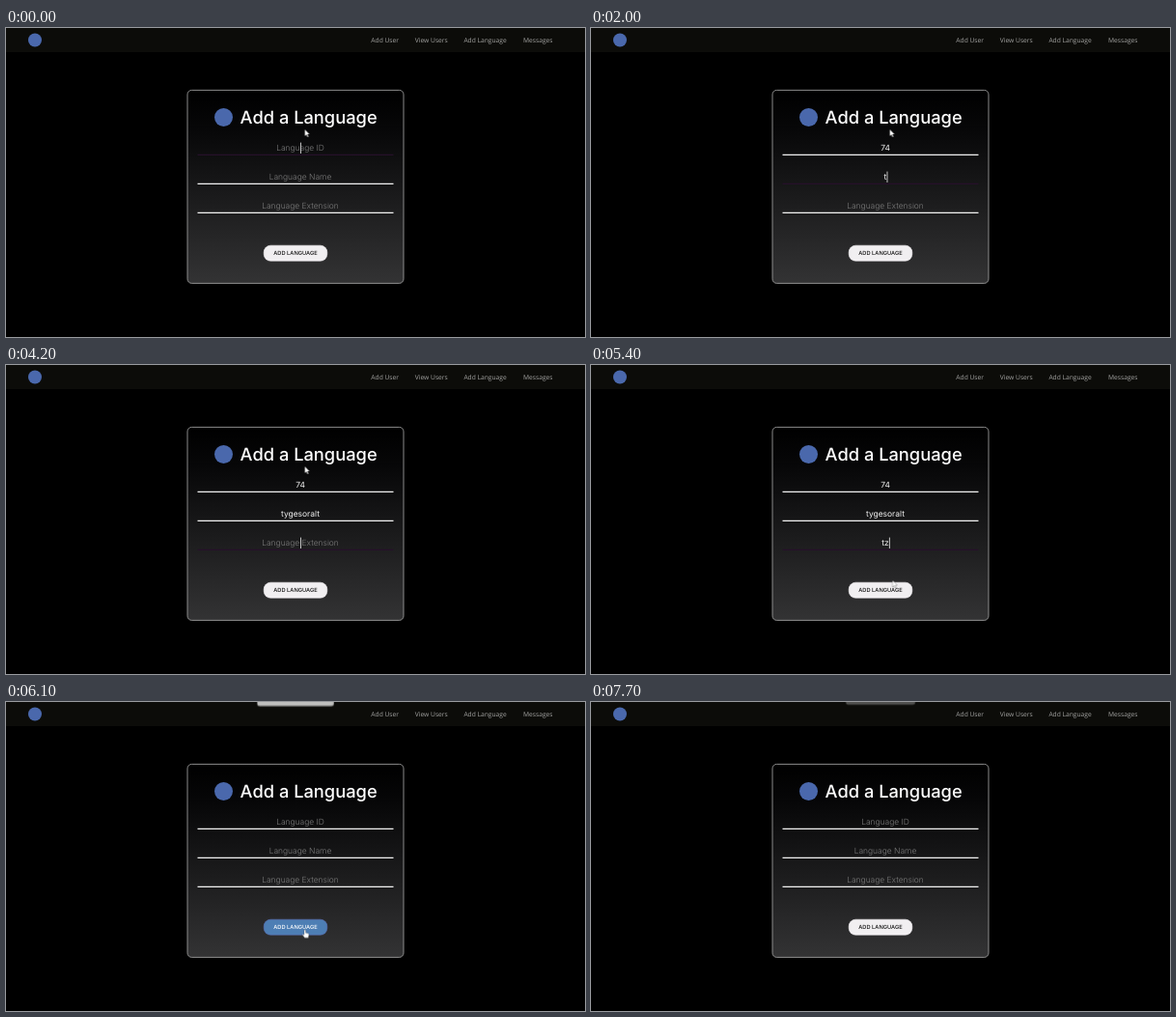
Recreate the animation shown at these times as an HTML page. Size 600 by 320 pixels, loop 7800 ms.

```html
<!DOCTYPE html>
<html lang="en">
<head>
<meta charset="utf-8">
<title>Add a Language</title>
<style>
  html, body { margin: 0; width: 100%; height: 100%; overflow: hidden; background: #000; }
  svg { display: block; width: 100%; height: 100%; }
  text { font-family: Inter, "Open Sans", sans-serif; text-rendering: geometricPrecision; }

  .nav text { font: 6.7px "Open Sans", "Noto Sans", sans-serif; fill: #a3a3a1; }
  .title { font-size: 18.3px; font-weight: 500; fill: #fff; }
  .field text { font-size: 8.45px; font-weight: 400; fill: #f4f4f4; text-anchor: middle; }
  .field text.empty { font-weight: 300; fill: #7b7b7b; }
  .field line { stroke: #f2f2f2; stroke-width: 1.3; }
  .field.focus line { stroke: #26102a; }
  #caret { fill: #eee; }

  .button text { font-size: 5.73px; font-weight: 500; text-anchor: middle; }
  .message { font-size: 8.45px; fill: #363636; }

  .button rect, .button text, .toast, .badge, .tick, .cursor, .arrow, .hand {
    animation: 7.8s linear infinite both;
  }
  .toast, .badge { transform-box: fill-box; transform-origin: center; }

  .button rect { animation-name: button-fill; }
  .button text { animation-name: button-text; }
  @keyframes button-fill {
    0%, 69.6%, 83.8%, 100% { fill: #f1eff1; stroke: #f1eff1; }
    72.4%, 81.3% { fill: #4d7eb4; stroke: #5d70b4; }
  }
  @keyframes button-text {
    0%, 69.6%, 83.8%, 100% { fill: #111; }
    72.4%, 81.3% { fill: #fff; }
  }

  .toast { animation-name: toast; }
  @keyframes toast {
    0%, 77.7% { transform: translateY(-45px) scale(.6); opacity: .5; animation-timing-function: cubic-bezier(.21, 1.02, .73, 1); }
    81.17% { transform: none; opacity: 1; }
    97.54% { transform: none; opacity: 1; animation-timing-function: cubic-bezier(.069, .549, .493, .865); }
    100% { transform: translateY(-31.2px) scale(.63); opacity: .075; }
  }

  .badge { animation-name: badge; }
  @keyframes badge {
    0%, 78.69% { transform: scale(0); animation-timing-function: cubic-bezier(.175, .885, .32, 1.275); }
    81.65%, 100% { transform: scale(1); }
  }

  .tick { stroke-dasharray: 1 2; animation-name: tick; }
  @keyframes tick {
    0%, 79.68% { stroke-dashoffset: 1.1; }
    81.65%, 100% { stroke-dashoffset: 0; }
  }

  .cursor { animation-name: cursor; }
  @keyframes cursor {
    0%, 63.4% { transform: translate(309.6px, 105px); animation-timing-function: ease-in-out; }
    69.2% { transform: translate(312.6px, 222.6px); animation-timing-function: ease-out; }
    71.8%, 80.7% { transform: translate(309px, 235.5px); animation-timing-function: ease-in-out; }
    83.1%, 92.9% { transform: translate(378.7px, 224.6px); animation-timing-function: ease-in; }
    95.5%, 100% { transform: translate(396px, 326px); }
  }

  .arrow, .hand { animation-timing-function: step-end; }
  .arrow { animation-name: arrow; }
  .hand { animation-name: hand; }
  @keyframes arrow { 0%, 81.3%, 100% { opacity: 1; } 69.8% { opacity: 0; } }
  @keyframes hand { 0%, 81.3%, 100% { opacity: 0; } 69.8% { opacity: 1; } }
</style>
</head>
<body>
<svg viewBox="0 0 600 320">
  <defs>
    <linearGradient id="card" x2="0" y2="1">
      <stop offset="0" stop-color="#000"/>
      <stop offset=".2" stop-color="#070708"/>
      <stop offset="1" stop-color="#333334"/>
    </linearGradient>
  </defs>
  <rect width="600" height="320"/>

  <g class="nav">
    <rect width="600" height="25" fill="#0c0c09"/>
    <circle cx="30" cy="12.5" r="7" fill="#4a68ac"/>
    <text x="378.3" y="15">Add User</text>
    <text x="423.8" y="15">View Users</text>
    <text x="474.4" y="15">Add Language</text>
    <text x="536" y="15">Messages</text>
  </g>

  <rect x="188" y="64.4" width="224" height="200" rx="4.5" fill="url(#card)" stroke="#9a9a9a" stroke-width=".9"/>
  <circle cx="225.5" cy="92.5" r="9.5" fill="#4a68ac"/>
  <text class="title" x="242.6" y="98.5">Add a Language</text>

  <g class="field"><text x="305" y="127.1"/><line x1="198.5" x2="401.5" y1="131.3" y2="131.3"/></g>
  <g class="field"><text x="305" y="157.1"/><line x1="198.5" x2="401.5" y1="161.3" y2="161.3"/></g>
  <g class="field"><text x="305" y="187.1"/><line x1="198.5" x2="401.5" y1="191.3" y2="191.3"/></g>
  <rect id="caret" width=".8" height="11.4"/>

  <g class="button">
    <rect x="267.2" y="225.2" width="65.6" height="16" rx="7" stroke-width=".6"/>
    <text x="300" y="235.4">ADD LANGUAGE</text>
  </g>

  <g class="toast">
    <rect x="249.7" y="7.6" width="100.5" height="22.5" rx="3.2" fill="#fff"/>
    <g class="badge">
      <circle cx="259.5" cy="18.7" r="5.3" fill="#61d345"/>
      <path class="tick" pathLength="1" d="M257.2 18.9l1.7 1.7 3-3.6" fill="none" stroke="#fff" stroke-width="1.1"/>
    </g>
    <text class="message" x="269.2" y="21.8">Language Added.</text>
  </g>

  <g class="cursor">
    <path class="arrow" d="M0 0V7L1.6 5.6 2.7 8 3.9 7.5 2.8 5.1H4.9Z" fill="#fff" stroke="#333" stroke-width=".3"/>
    <path class="hand" d="M0 .8Q.8-.5 1.6.8V3.6L4.4 4.2Q5 4.4 4.9 5.4L4.3 8.8H.6L-1.8 5.8Q-1.6 4.6-.6 5.2L0 5.7Z" fill="#fff" stroke="#333" stroke-width=".3"/>
  </g>
</svg>

<script>
  const LOOP = 7800;
  const LEAD = 20; // steps land just before each tenth of a second
  const CLEARED = 6050;

  // keys: [time, number of letters typed so far]
  const fields = [
    { hint: 'Language ID', value: '74', focus: [-LEAD, 1300], keys: [[400, 1], [500, 2]] },
    { hint: 'Language Name', value: 'tygesoralt', focus: [1300, 3900],
      keys: [[2000, 1], [2200, 2], [2500, 3], [2700, 4], [2900, 5], [3000, 6], [3100, 8], [3300, 9], [3400, 10]] },
    { hint: 'Language Extension', value: 'tz', focus: [3900, 5800], keys: [[4500, 1], [4600, 2]] }
  ];
  const caretOn = [[-LEAD, 900], [1300, 1600], [2000, 3500], [3900, 4285], [4500, 4985], [5370, 5755]];

  const groups = document.querySelectorAll('.field');
  const caret = document.getElementById('caret');
  const within = (t, [from, to]) => t >= from && t < to;

  function draw(t) {
    fields.forEach(({ hint, value, focus, keys }, i) => {
      const label = groups[i].firstElementChild;
      const typed = t < CLEARED ? keys.filter(([at]) => at <= t).pop() : null;
      const focused = within(t, focus);
      label.textContent = typed ? value.slice(0, typed[1]) : hint;
      label.classList.toggle('empty', !typed);
      groups[i].classList.toggle('focus', focused);
      if (focused) {
        const half = typed ? label.getComputedTextLength() / 2 : 0;
        caret.setAttribute('x', 305.2 + half);
        caret.setAttribute('y', 118.6 + 30 * i);
      }
    });
    caret.style.opacity = caretOn.some(span => within(t, span)) ? 1 : 0;
  }

  let start;
  function tick(now) {
    start ??= now;
    draw((now - start + LEAD) % LOOP);
    requestAnimationFrame(tick);
  }
  draw(0);
  requestAnimationFrame(tick);
</script>
</body>
</html>
```
